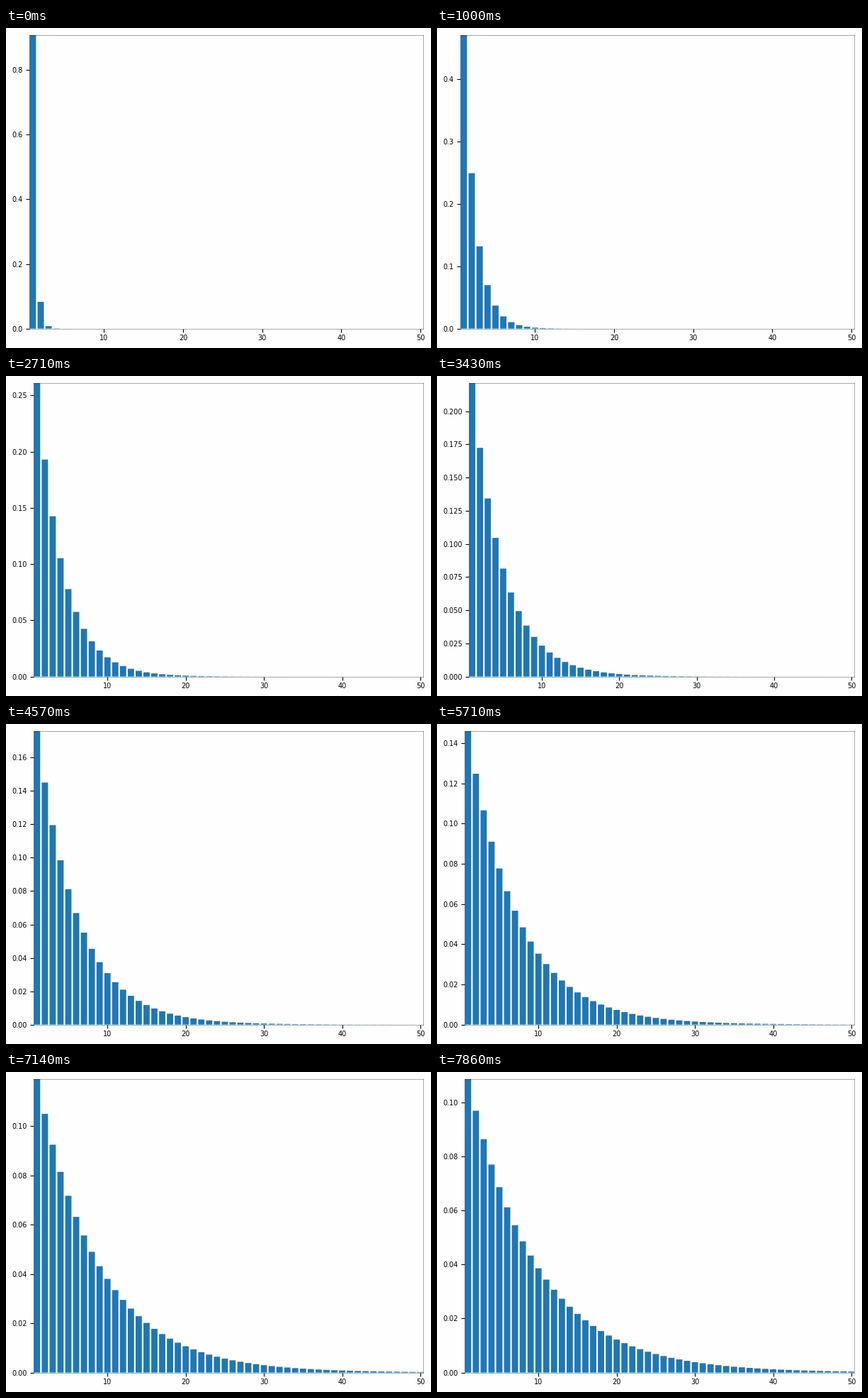
A matplotlib script that plays this animation: 600 by 451 pixels, repeating every 8 s.

```python
import numpy as np
import matplotlib.pyplot as plt
from matplotlib.animation import FuncAnimation

W, H = 600, 451
LOOP_MS, TICK_MS, STEPS = 8000, 40, 56
BARS = 50
LEFT, RIGHT, TOP, BOTTOM = 33.4, 589.4, 9.6, 423.6
DIGIT_W = 6

# Mean of the geometric distribution at a few steps
MEAN_AT = [0, 13, 24, 45, 55]
MEANS = [1.1, 3.0, 4.517, 7.57, 9.2]

plt.rcParams.update({"font.family": "DejaVu Sans", "font.size": 7})
fig = plt.figure(figsize=(W / 100, H / 100), dpi=100, facecolor="#fefefe")
ax = fig.add_axes([0.1, 0.1, 0.8, 0.8], facecolor="#fefefe")
ks = np.arange(1, BARS + 1)
bars = ax.bar(ks, np.zeros(BARS), width=0.8, color="#1f77b4", snap=False)
ax.set_xlim(0.6, BARS + 0.4)
ax.tick_params(axis="x", pad=2.8)
for spine in ax.spines.values():
    spine.set(color="black", alpha=0.33, linewidth=0.72)


def place_axes():
    # The left edge follows the width of the y labels
    axis = ax.yaxis
    label = axis.get_major_formatter().format_ticks(axis.get_majorticklocs())[0]
    left = LEFT + DIGIT_W * (len(label) - 3)
    ax.set_position([left / W, 1 - BOTTOM / H,
                     (RIGHT - left) / W, (BOTTOM - TOP) / H])


def update(tick):
    # Each tick shows the step reached by its end
    step = int(((tick + 0.95) * TICK_MS) * STEPS / LOOP_MS)
    p = 1 / np.interp(step, MEAN_AT, MEANS)
    for bar, height in zip(bars, p * (1 - p) ** (ks - 1)):
        bar.set_height(height)
    ax.set_ylim(0, p)
    place_axes()
    return list(bars)


anim = FuncAnimation(fig, update, frames=LOOP_MS // TICK_MS,
                     init_func=lambda: update(0), interval=TICK_MS,
                     repeat=True, repeat_delay=0, blit=False)
plt.show()
```
